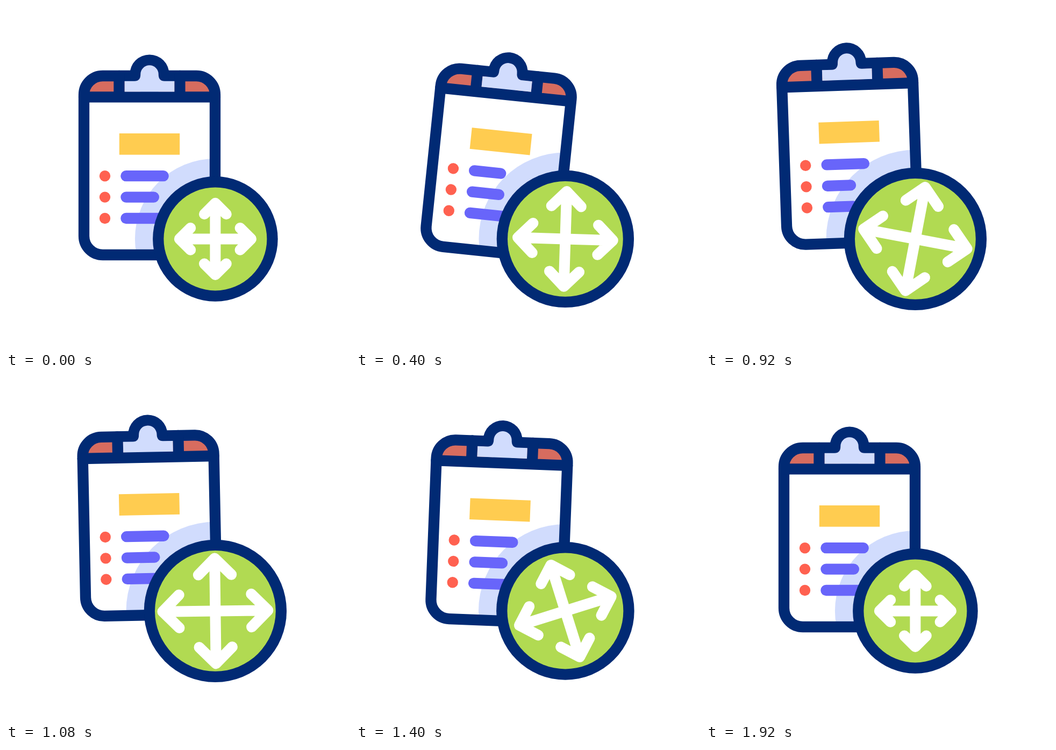
Animation, 640 px wide and 640 px high, one loop 2.32 s. Source, as an HTML page with a canvas:

```html
<!DOCTYPE html>
<html lang="en">
<head>
<meta charset="utf-8">
<title>Clipboard</title>
<style>
html, body { margin: 0; width: 100%; height: 100%; overflow: hidden; background: #fff; }
canvas { display: block; }
</style>
</head>
<body>
<canvas width="640" height="640"></canvas>
<script>
const ctx = document.querySelector('canvas').getContext('2d');
const LOOP = 2320, STEP = 40, TAU = Math.PI * 2, LINE = 20.3;
const NAVY = '#012a74', PALE = '#d1dcfd', RED = '#ff6150', BRICK = '#d76c5f';
const YELLOW = '#ffcc50', VIOLET = '#6865fa', GREEN = '#b1da52';

// Progress from 0 to 1 between two times, eased in and out.
function ease(t, from, to) {
  const p = Math.min(1, Math.max(0, (t - from) / (to - from)));
  return p * p * (3 - 2 * p);
}

// Up during a..b, held, down again during c..d.
const pulse = (t, a, b, c, d) => ease(t, a, b) - ease(t, c, d);

const lift = t => -22.2 * pulse(t, 220, 800, 1030, 1785);
const grow = t => pulse(t, 20, 620, 1250, 1690);
const tilt = t => 6.3 * pulse(t, 0, 470, 470, 940)
  - 2 * pulse(t, 470, 940, 940, 1440) + 2.3 * pulse(t, 940, 1440, 1440, 1920);
const spin = t => 23.8 * pulse(t, 360, 600, 600, 1460) - 18 * pulse(t, 600, 1460, 1460, 1860);
const shrink = (t, i) =>
  1 - 0.42 * pulse(t, 200 + 140 * i, 520 + 210 * i, 520 + 210 * i, 840 + 220 * i);

function disc(x, y, r, color) {
  ctx.fillStyle = color;
  ctx.beginPath();
  ctx.arc(x, y, r, 0, TAU);
  ctx.fill();
}

function rect(x, y, w, h, color) {
  ctx.fillStyle = color;
  ctx.fillRect(x, y, w, h);
}

function stroke(path, color, width = LINE) {
  ctx.strokeStyle = color;
  ctx.lineWidth = width;
  ctx.stroke(path);
}

const sheet = new Path2D();
sheet.roundRect(145, 130, 244, 333, 35);
const frame = new Path2D('M145 169.4H389M210.5 130V169M323.4 130V169');
const clipShape = new Path2D('M220.7 159.5V139.8H239Q250.3 139.8 250.3 127' +
  'a16.7 16.7 0 0 1 33.4 0Q283.7 139.8 295 139.8H313.3V159.5Z');

function drawBoard(t, cx, cy, halo) {
  ctx.save();
  ctx.translate(267, 282 + lift(t));
  ctx.rotate(tilt(t) * Math.PI / 180);
  ctx.translate(-267, -282);

  // The halo follows the badge but shows only on the sheet.
  ctx.save();
  ctx.clip(sheet);
  rect(140, 125, 254, 44, BRICK);
  ctx.resetTransform();
  disc(cx, cy, halo, PALE);
  ctx.restore();

  rect(210.8, 237, 112.4, 39.7, YELLOW);
  [69.3, 51.5, 80].forEach((length, i) => {
    const y = 316.2 + i * 39.4;
    disc(184, y, 10.2, RED);
    stroke(new Path2D(`M223.4 ${y}h${length * shrink(t, i)}`), VIOLET);
  });

  stroke(sheet, NAVY);
  stroke(frame, NAVY);
  disc(267, 127, 36.6, NAVY);
  ctx.fillStyle = PALE;
  ctx.fill(clipShape);
  ctx.restore();
}

function drawBadge(t, cx, cy, r, size) {
  disc(cx, cy, r, NAVY);
  disc(cx, cy, r - LINE, GREEN);
  const tip = 66.6 + 31.4 * size, barb = 20.4 + 10.3 * size;
  const arrow = new Path2D(`M0 0V${-tip}M${-barb} ${barb - tip}L0 ${-tip}L${barb} ${barb - tip}`);
  ctx.save();
  ctx.translate(cx, cy);
  ctx.rotate(spin(t) * Math.PI / 180);
  for (let i = 0; i < 4; i++) {
    stroke(arrow, '#fff', 20);
    ctx.rotate(TAU / 4);
  }
  ctx.restore();
}

function draw(now) {
  const t = Math.floor(now % LOOP / STEP) * STEP;
  const size = grow(t), r = 116.3 + 16.4 * size, cx = 389.4, cy = 433.4;
  rect(0, 0, 640, 640, '#fff');
  drawBoard(t, cx, cy, r + 33.2);
  drawBadge(t, cx, cy, r, size);
}

ctx.lineCap = ctx.lineJoin = 'round';
const start = performance.now();
function tick() {
  draw(performance.now() - start);
  requestAnimationFrame(tick);
}
tick();
</script>
</body>
</html>
```
